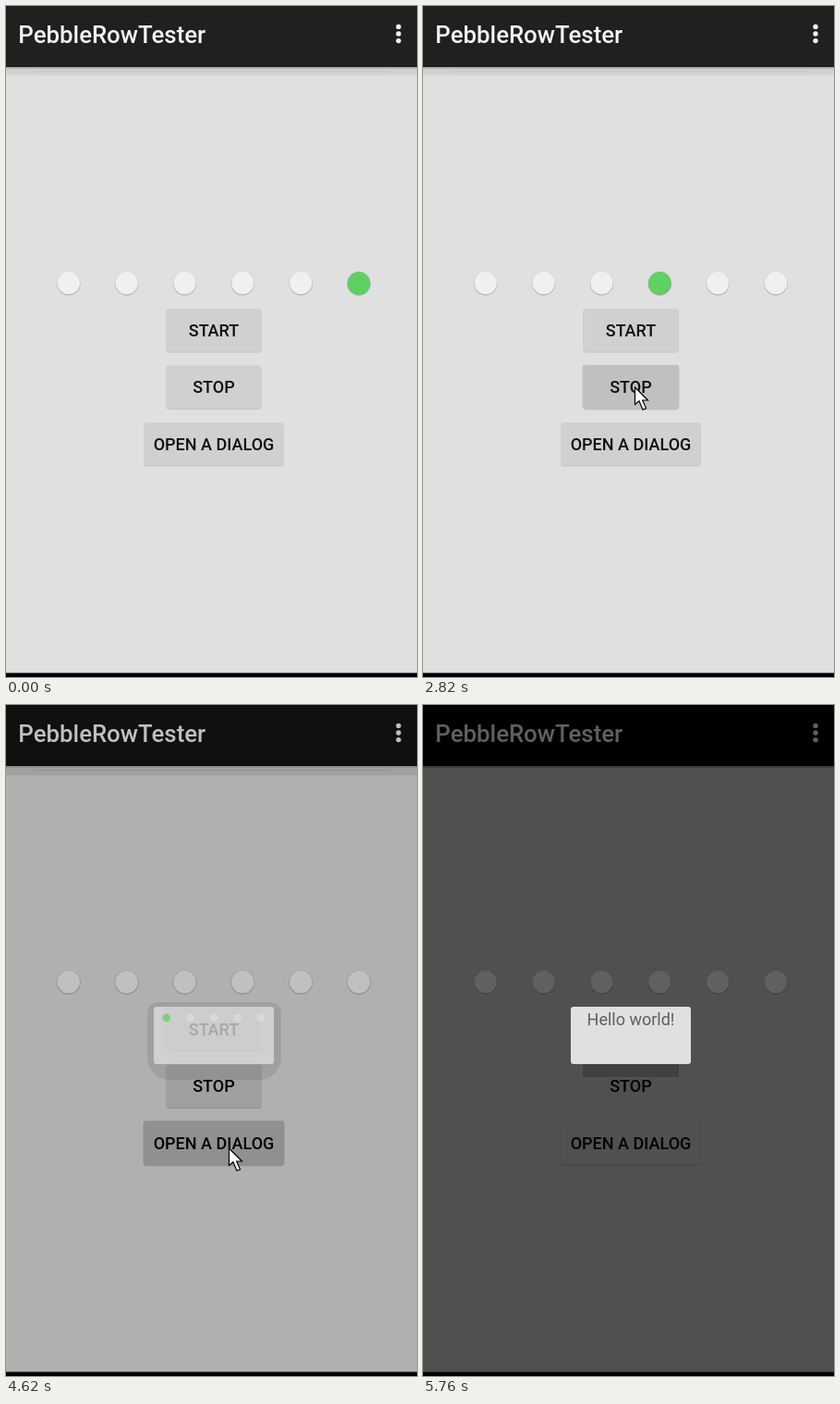
An HTML page with a canvas for the animation above (6.48 s loop, 445 by 725 pixels).

```html
<!DOCTYPE html>
<html lang="en">
<head>
<meta charset="utf-8">
<title>Dotted progress bar</title>
<style>
  html, body { margin: 0; width: 100%; height: 100%; overflow: hidden; background: #e0e0e0; }
  canvas { display: block; }
</style>
</head>
<body>
<canvas id="stage" width="445" height="725"></canvas>
<script>
const ctx = document.getElementById('stage').getContext('2d');
const LOOP = 6480, STEP = 60;
const STOP_AT = 2820, OPEN_AT = 4560, DIALOG_AT = 4620, TEXT_AT = 5760;
const GREEN = '#5fd162';

// Each move eases to x, y; bend bows the path sideways and down on the way
const moves = [
  { from: 540, to: 960, x: 240, y: 407, bend: [0, 6] },
  { from: 1140, to: 1440, x: 229, y: 412, bend: [4, 9] },
  { from: 3240, to: 3900, x: 241, y: 479, bend: [18, 24] },
  { from: 4800, to: 5160, x: 455, y: 500, bend: [0, 0] }
];
const pointerStart = { x: 450, y: 428 };
const arrow = new Path2D('M0 0V18.5L4.5 14.8L8.5 24.2L12 22.6L8.1 14H14Z');

const clamp = (v, lo = 0, hi = 1) => Math.min(hi, Math.max(lo, v));
const ease = p => p * p * (3 - 2 * p);

let light = 1;

// Gray level under the dim layer, in the screen's coarse shades
function gray(v) {
  const level = light < 1 ? Math.floor(v * light / 16) * 16 : v;
  return `rgb(${level},${level},${level})`;
}

function rect(x, y, w, h, color) {
  ctx.fillStyle = color;
  ctx.fillRect(x, y, w, h);
}

function rounded(x, y, w, h, r, color) {
  ctx.fillStyle = color;
  ctx.beginPath();
  ctx.roundRect(x, y, w, h, r);
  ctx.fill();
}

function circle(x, y, r, color) {
  ctx.fillStyle = color;
  ctx.beginPath();
  ctx.arc(x, y, r, 0, 2 * Math.PI);
  ctx.fill();
}

function label(text, x, y, font, color, align = 'center') {
  ctx.font = `${font} Roboto, sans-serif`;
  ctx.textAlign = align;
  ctx.fillStyle = color;
  ctx.fillText(text, x, y);
}

function drawButton(text, y, width, { fill = gray(208), shadow = gray(196), pressed = false } = {}) {
  const x = 225 - width / 2, grow = pressed ? 0.7 : 0;
  rounded(x, y + 1, width, 46.5 + grow, 3, shadow);
  rounded(x - grow, y - grow, width + 2 * grow, 46.5 + 2 * grow, 3, fill);
  label(text, 225, y + 30, '500 18px', gray(16));
}

function drawAppBar() {
  rounded(-4, 60, 453, 16, 8, gray(219));
  rounded(-4, 60, 453, 14, 8, gray(208));
  rect(32, 70, 383, 1, gray(198));
  rect(0, 66, 445, 2, gray(180));
  rect(0, 0, 445, 66, gray(32));
  label('PebbleRowTester', 13.3, 39.5, '500 25.8px', gray(244), 'left');
  for (let i = -1; i <= 1; i++) circle(425, 30 + i * 7.6, 2.7, gray(244));
}

function drawBar(t) {
  // The bar speeds up a little once the pointer settles, then halts
  const pulse = Math.min(10, Math.floor(t < 2040 ? t / 274 : (t - 120) / 240));
  const active = t <= STOP_AT ? (5 + pulse) % 6 : -1;
  for (let i = 0; i < 6; i++) {
    const x = 67.8 + i * 62.85, on = i === active;
    circle(x, 299.6, 13.2, gray(219));
    circle(x, 300.1, 12.6, gray(on ? 160 : 180));
    circle(x, 299.3, 12.2, on ? GREEN : gray(240));
  }
}

function drawButtons(t) {
  const stopPressed = t >= STOP_AT && t < 3060;
  const opening = t >= OPEN_AT;
  const fade = clamp((t - 4740) / 360);

  drawButton('START', 327, 103.5);
  drawButton('STOP', 388.4, 103.5, { fill: gray(stopPressed ? 192 : 208), pressed: stopPressed });
  drawButton('OPEN A DIALOG', 450, 151.5, {
    fill: t < 4740 ? gray(opening ? 192 : 208) : `rgb(${64 + 16 * fade},80,80)`,
    shadow: gray(t >= 4260 ? 184 : 196),
    pressed: opening && t < 4740
  });
}

function drawDialog(t) {
  if (t < DIALOG_AT) return;
  const opacity = clamp(0.75 + 0.125 * (t - DIALOG_AT) / STEP);
  if (opacity < 1) rounded(153, 321, 145, 84, [12, 12, 24, 24], 'rgba(0,0,0,.09)');
  else rect(173, 388, 104, 14, '#404040');

  ctx.globalAlpha = opacity;
  rounded(160, 326, 130, 62, 3, '#e0e0e0');
  if (t >= TEXT_AT) {
    label('Hello world!', 225, 345.5, '400 18px', '#606060');
  } else {
    const active = Math.max(0, Math.floor((t - 4710) / 126)) % 5;
    for (let i = 0; i < 5; i++) {
      const x = 173.7 + i * 25.6, on = i === active;
      ctx.globalAlpha = on ? opacity : opacity ** 4;
      circle(x, 338.3, 4.7, '#d0d0d0');
      circle(x, 338, 4.4, on ? GREEN : '#f0f0f0');
    }
  }
  ctx.globalAlpha = 1;
}

function drawPointer(t) {
  let { x, y } = pointerStart;
  for (const move of moves) {
    const p = ease(clamp((t - move.from) / (move.to - move.from)));
    const bow = Math.sin(Math.PI * p);
    if (p === 0) break;
    x += (move.x - x) * p + move.bend[0] * bow;
    y += (move.y - y) * p + move.bend[1] * bow;
  }
  ctx.save();
  ctx.translate(x + 0.5, y);
  ctx.fillStyle = '#fff';
  ctx.fill(arrow);
  ctx.lineWidth = 1.2;
  ctx.strokeStyle = '#000';
  ctx.stroke(arrow);
  ctx.restore();
}

function draw(t) {
  light = clamp(1 - 0.2 * (t - OPEN_AT) / STEP, 0.41, 1);
  rect(0, 0, 445, 725, gray(224));
  drawAppBar();
  drawBar(t);
  drawButtons(t);
  rect(0, 720, 445, 1, gray(128));
  rect(0, 721, 445, 4, '#000');
  drawDialog(t);
  drawPointer(t);
}

const start = performance.now();
function tick() {
  const t = (performance.now() - start) % LOOP;
  draw(Math.floor(t / STEP) * STEP);
  requestAnimationFrame(tick);
}
tick();
</script>
</body>
</html>
```
